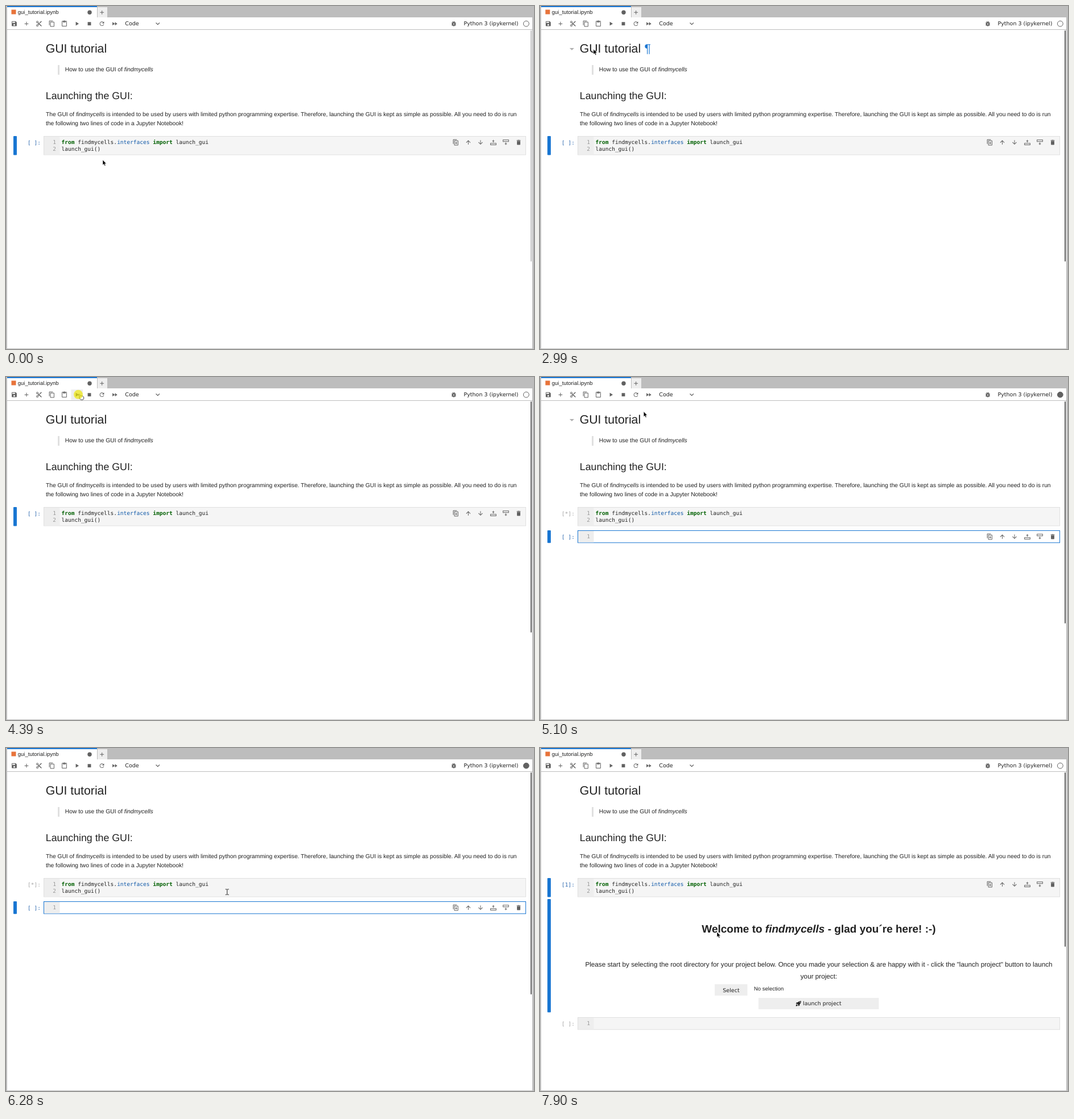
Write an HTML page that moves like this. It is 928 px wide and 604 px high and loops after 8 s.

```html
<!DOCTYPE html>
<html lang="en">
<head>
<meta charset="utf-8">
<title>Notebook tutorial</title>
<style>
html, body { margin: 0; height: 100%; overflow: hidden; background: #bdbdbd; }
svg { display: block; width: 928px; height: 604px; }
text { fill: #212121; text-rendering: geometricPrecision; font-family: "Liberation Sans", Arial, sans-serif; }
.ui { font-family: "DejaVu Sans", sans-serif; }
.mono { font-family: "DejaVu Sans Mono", monospace; }
.icon { fill: #616161; }
.mid { text-anchor: middle; }
.end { text-anchor: end; }
</style>
</head>
<body>
<svg viewBox="0 0 928 604"><g id="frame"></g><g id="live"></g></svg>
<script>
const BLUE = '#1976d2';
const ICONS = {
  save: 'M17 3H5c-1.11 0-2 .9-2 2v14c0 1.1.89 2 2 2h14c1.1 0 2-.9 2-2V7l-4-4zm-5 16c-1.66 0-3-1.34-3-3s1.34-3 3-3 3 1.34 3 3-1.34 3-3 3zm3-10H5V5h10v4z',
  add: 'M19 13h-6v6h-2v-6H5v-2h6V5h2v6h6v2z',
  cut: 'M6 2a4 4 0 1 0 0 8 4 4 0 1 0 0-8zm0 2a2 2 0 1 1 0 4 2 2 0 1 1 0-4zM6 14a4 4 0 1 0 0 8 4 4 0 1 0 0-8zm0 2a2 2 0 1 1 0 4 2 2 0 1 1 0-4zM9.6 7.6L22 20v1h-3l-7-7-2.4 2.4-2-2L10 12 7.600 9.600zM19 3l-6 6 2 2 7-7V3z',
  copy: 'M16 1H4c-1.1 0-2 .9-2 2v14h2V3h12V1zm3 4H8c-1.1 0-2 .9-2 2v14c0 1.1.9 2 2 2h11c1.1 0 2-.9 2-2V7c0-1.1-.9-2-2-2zm0 16H8V7h11v14z',
  paste: 'M19 2h-4.18C14.4.84 13.3 0 12 0c-1.3 0-2.4.84-2.82 2H5c-1.1 0-2 .9-2 2v16c0 1.1.9 2 2 2h14c1.1 0 2-.9 2-2V4c0-1.1-.9-2-2-2zm-7 0c.55 0 1 .45 1 1s-.45 1-1 1-1-.45-1-1 .45-1 1-1zm7 18H5V4h2v3h10V4h2v16z',
  play: 'M8 5v14l11-7z',
  stop: 'M6 6h12v12H6z',
  restart: 'M17.65 6.35C16.2 4.9 14.21 4 12 4c-4.42 0-8 3.58-8 8s3.58 8 8 8c3.73 0 6.84-2.55 7.73-6h-2.08c-.82 2.33-3.04 4-5.65 4-3.31 0-6-2.69-6-6s2.69-6 6-6c1.66 0 3.14.69 4.22 1.78L13 11h7V4z',
  forward: 'M4 18l8.500-6L4 6v12zm9-12v12l8.500-6L13 6z',
  bug: 'M20 8h-2.81c-.45-.78-1.07-1.45-1.82-1.96L17 4.41 15.590 3l-2.170 2.170a6 6 0 0 0-2.830 0L8.410 3 7 4.410l1.620 1.630C7.880 6.550 7.260 7.220 6.810 8H4v2h2.090L6 12H4v2h2l.09 2H4v2h2.810a6 6 0 0 0 10.380 0H20v-2h-2.090L18 14h2v-2h-2l-.09-2H20zm-6 8h-4v-2h4zm0-4h-4v-2h4z',
  clone: 'M16 1H4c-1.1 0-2 .9-2 2v14h2V3h12V1zm3 4H8c-1.1 0-2 .9-2 2v14c0 1.1.9 2 2 2h11c1.1 0 2-.9 2-2V7c0-1.1-.9-2-2-2zm0 16H8V7h11v14zM12.500 10h2v3h3v2h-3v3h-2v-3h-3v-2h3z',
  up: 'M4 12l1.41 1.41L11 7.83V20h2V7.830l5.590 5.590L20 12l-8-8-8 8z',
  down: 'M4 12l1.410-1.410L11 16.170V4h2v12.170l5.590-5.590L20 12l-8 8-8-8z',
  above: 'M1 14h22v8H1zm2 2v4h18v-4zM11 3h2v3h3v2h-3v4h-2V8H8V6h3z',
  below: 'M1 2h22v8H1zm2 2v4h18V4zM11 12h2v4h3v2h-3v3h-2v-3H8v-2h3z',
  trash: 'M6 19c0 1.1.9 2 2 2h8c1.1 0 2-.9 2-2V7H6v12zM19 4h-3.500l-1-1h-5l-1 1H5v2h14V4z',
  rocket: 'M23 1C16 1 12 3 9 7H4l-3 6h6l4 4v6l6-3v-5c4-3 6-7 6-14zm-5 3a2 2 0 1 1 0 4 2 2 0 1 1 0-4zM5 15c-3 1-4 4-4 8 4 0 7-1 8-4z'
};
const icon = (name, x, y, size = 11.7, fill = '#616161') =>
  `<path d="${ICONS[name]}" fill="${fill}" fill-rule="evenodd" transform="translate(${x - size / 2} ${y - size / 2}) scale(${size / 24})"/>`;
const rect = (x, y, w, h, fill, more = '') =>
  `<rect x="${x}" y="${y}" width="${w}" height="${h}" fill="${fill}" ${more}/>`;
const text = (s, x, y, size, cls = '', more = '') =>
  `<text x="${x}" y="${y}" font-size="${size}" class="${cls}" ${more}>${s}</text>`;
const path = (d, fill, more = '') => `<path d="${d}" fill="${fill}" ${more}/>`;
const lean = '<tspan font-style="italic">findmycells</tspan>';

function chrome() {
  const tools = { save: 14.5, add: 36, cut: 58, copy: 80.5, paste: 102.5, stop: 146.5, restart: 168.5, forward: 191, bug: 787 };
  return rect(2, 20, 923, 583, '#fff') + rect(2, 0, 158, 21, '#fff') + rect(2, 0, 158, 2, BLUE) +
    rect(161, 2, 17, 18, '#eee') + rect(2, 41, 923, 1, '#bdbdbd') +
    rect(9.5, 6.5, 8, 8, '#e8733a') + text('gui_tutorial.ipynb', 20.8, 13.6, 9.5) +
    '<circle cx="147" cy="11.2" r="3.7" class="icon"/>' + icon('add', 168.7, 11.3) +
    Object.entries(tools).map(([name, x]) => icon(name, x, 31.2)).join('') +
    text('Code', 209.3, 34.4, 9.5, 'ui') + text('Python 3 (ipykernel)', 804.5, 34.4, 9.5, 'ui') +
    path('M263.500 29.500l3.200 3.200 3.200-3.200', 'none', 'stroke="#616161" stroke-width="1.2"') +
    text('GUI tutorial', 69.7, 82.3, 21.25) +
    rect(91, 104, 3, 17, '#e0e0e0') + text('How to use the GUI of ' + lean, 103.8, 115.4, 10.29) +
    text('Launching the GUI:', 69.8, 163.9, 17.75) +
    text(`The GUI of ${lean} is intended to be used by users with limited python programming expertise. Therefore, launching the GUI is kept as simple as possible. All you need to do is run`, 70, 193.5, 10.24) +
    text('the following two lines of code in a Jupyter Notebook!', 70, 209.6, 10.27);
}

function cell(y, h, lines, prompt, active, editing) {
  const tools = { clone: 790.5, up: 812.5, down: 834, above: 856.5, below: 878.5, trash: 901 };
  const out = [
    rect(66.5, y + .5, 847, h, editing ? '#fff' : '#f5f5f5', `stroke="${editing ? BLUE : '#e0e0e0'}"`),
    rect(67, y + 1, 27.5, h - 1, '#eee'),
    text(prompt, 61, y + 14.5, 9.55, 'mono end', `style="fill:${active ? '#2f6ab0' : '#a6a6a6'}"`)
  ];
  lines.forEach((line, i) => out.push(
    text(i + 1, 88, y + 13.6 + i * 12.6, 9.55, 'mono end', 'style="fill:#999"'),
    text(line, 97.4, y + 13.6 + i * 12.6, 9.55, 'mono')));
  if (active) {
    out.push(rect(13, y, 6, h + 1, BLUE, 'rx="1"'));
    for (const name in tools) out.push(icon(name, tools[name], y + 11.2));
  }
  return out.join('');
}

const welcome =
  text(`Welcome to ${lean} - glad you´re here! :-)`, 490, 324.700, 19, 'mid', 'font-weight="bold"') +
  text('Please start by selecting the root directory for your project below. Once you made your selection &amp; are happy with it - click the "launch project" button to launch', 490, 385.200, 11.72, 'mid') +
  text('your project:', 490, 405.600, 11.72, 'mid') +
  rect(307, 416, 57.5, 20, '#eee') + text('Select', 336, 429.600, 9.5, 'ui mid') +
  text('No selection', 376, 427, 9.5) +
  rect(384, 440, 211.5, 20, '#eee') + icon('rocket', 454.3, 450, 10, '#212121') +
  text('launch project', 462, 453.300, 9.5, 'ui');

const code = [
  '<tspan font-weight="bold" fill="#006000">from</tspan> findmycells.<tspan fill="#0f58a8">interfaces</tspan> <tspan font-weight="bold" fill="#006000">import</tspan> launch_gui',
  'launch_gui()'
];

// Pointer moves: first step, last step, step count, then Bezier points after the current position
const moves = [
  [510, 510, 1, [169.5, 271]],
  [830, 1560, 8, [140, 312], [47, 287], [50, 248]],
  [1670, 1670, 1, [48.5, 248]],
  [1970, 1970, 1, [44.5, 248]],
  [2070, 2070, 1, [48.5, 247]],
  [2470, 3190, 8, [83.5, 86.5], [106, 50]],
  [3290, 3390, 2, [126.5, 26.5]],
  [3590, 3690, 2, [127, 30]],
  [5000, 5790, 9, [250, 95], [384, 200]],
  [5890, 6080, 3, [392, 222], [394, 236]],
  [6280, 6780, 6, [385, 290], [292.5, 316.5]],
  [7900, 7900, 1, [311, 324]]
];

function bezier(points, u) {
  while (points.length > 1)
    points = points.slice(1).map((p, i) => p.map((v, k) => points[i][k] + (v - points[i][k]) * u));
  return points[0];
}

function pointer(t) {
  let pos = [170, 271];
  for (const [start, end, count, ...points] of moves) {
    if (t < start) break;
    const step = count > 1 ? Math.floor((t - start) / (end - start) * (count - 1) + .04) : 0;
    pos = bezier([pos, ...points], Math.min(1, (step + 1) / count));
  }
  return pos;
}

const cursors = {
  arrow: path('M0 0V9L2 7.300 3.500 10.400 5 9.800 3.600 6.700H6.300Z', '#000', 'stroke="#fff" stroke-width=".5"'),
  hand: path('M.3.9C.7-.1 1.900 0 2.400.9L4.200 3.600 7 3.200 9.500 5 9.800 8 8.400 10H4.600L1.200 6.800 2 5.800 3 6Z', '#fff', 'stroke="#222" stroke-width=".8"'),
  beam: path('M-3-4.500H-1L0-4 1-4.500H3M0-4V4.500M-3 5H-1L0 4.500 1 5H3', 'none', 'stroke="#222"')
};

function scene(t) {
  const ran = t >= 4490, done = t >= 6480, back = t >= 7300;
  const [x, y] = pointer(t);
  const within = (l, top, r, bottom) => x >= l && x < r && y >= top && y < bottom;
  const onPlay = within(115, 22, 135, 41);
  const inCode = within(66, 229, 914, 262) || (ran && !done && within(66, 270, 914, 292));
  const click = (t >= 4290 && t < 4600) || (t >= 7105 && t < 7300);
  const caret = ran && !back && Math.floor((t - 4480) / 523) % 2 === 0;
  const nextY = done ? 474 : 270;
  const thumb = t < 1970 ? '#c1c1c1' : t < 2070 ? '#949494' : '#5f5f5f';
  const hover = [[49, 132, 74, 62, 88, 183.5, 82.3, 21.25], [138, 220, 157, 147, 170, 228, 163.9, 17.75]];
  let s = rect(922, 43, 2, (done ? 350 : ran ? 434 : 450) - 43, thumb, 'rx="1"');

  if (onPlay) s += rect(114.5, 22, 20.5, 18.5, '#eee');
  s += icon('play', 124.6, 31.2);
  s += `<circle cx="914.3" cy="31.2" r="4.9" fill="${ran && !done ? '#616161' : '#fff'}" stroke="#616161"/>`;

  for (const [top, bottom, markY, rowTop, rowEnd, signX, signY, size] of hover) {
    if (within(0, top, 920, bottom)) s += path(`M52 ${markY}h8l-4 4z`, '#b0b0b0');
    if (within(70, rowTop, 914, rowEnd)) s += text('¶', signX, signY, size, '', `style="fill:${BLUE}"`);
  }

  s += cell(229, 32.5, code, done ? '[1]:' : ran ? '[*]:' : '[ ]:', !ran || back, false);
  if (done) s += welcome;
  if (back) s += rect(13, 266, 6, 199.5, BLUE, 'rx="1"');
  if (ran) s += cell(nextY, 21.3, [''], '[ ]:', !back, !back);
  if (caret) s += rect(97, nextY + 5, 1, 12, '#212121');

  s += `<g transform="translate(${x} ${y})">${cursors[onPlay ? 'hand' : inCode ? 'beam' : 'arrow']}</g>`;
  if (click) s += `<circle cx="${x}" cy="${y + .8}" r="8" fill="#eee600" opacity=".68"/>`;
  return s;
}

const live = document.getElementById('live');
let shown = '';
document.getElementById('frame').innerHTML = chrome();

function draw() {
  const markup = scene(performance.now() % 8000);
  if (markup !== shown) live.innerHTML = shown = markup;
  requestAnimationFrame(draw);
}
draw();
</script>
</body>
</html>
```
